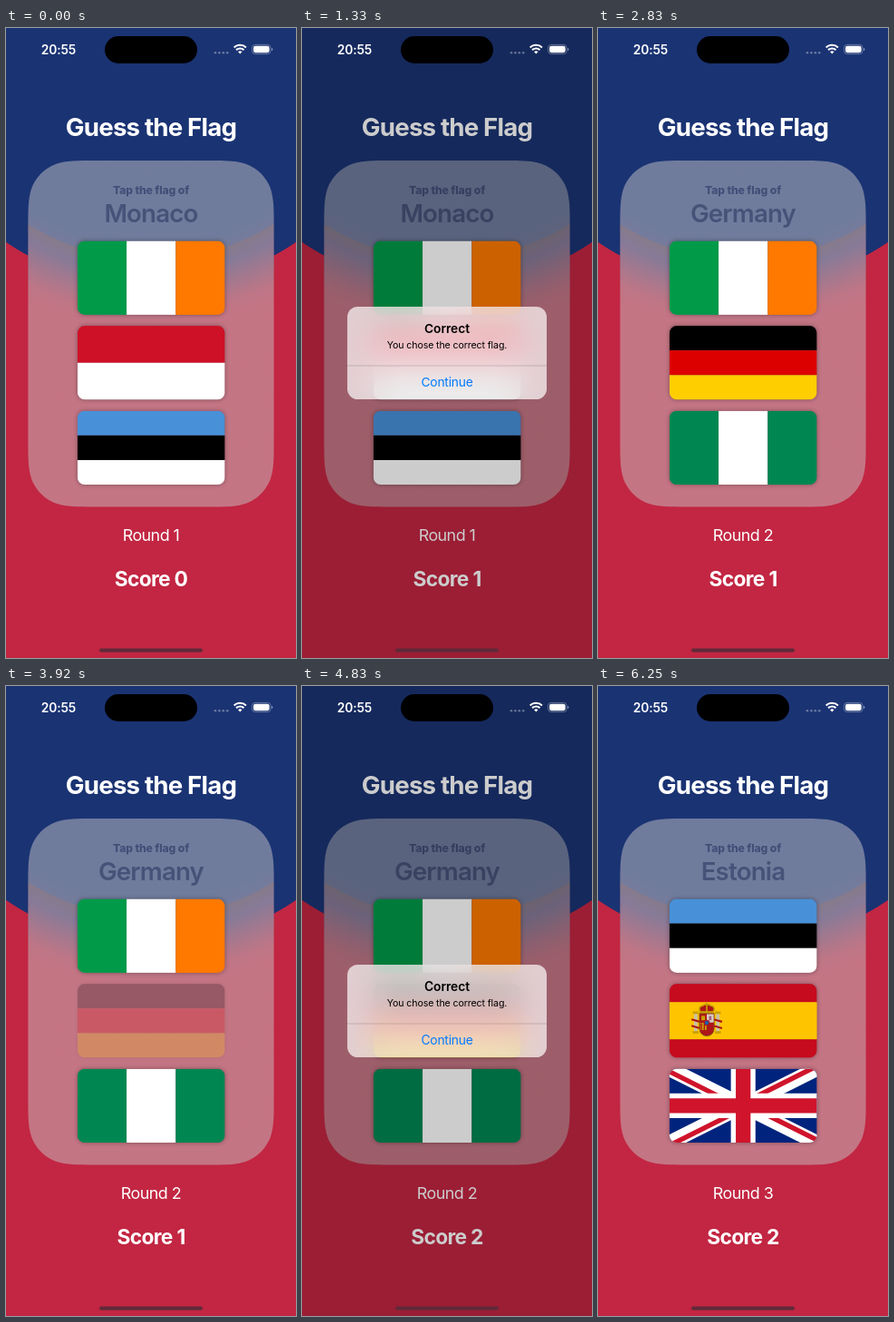
An HTML page for the animation above (8000 ms loop, 320 px wide and 694 px high).

```html
<!DOCTYPE html>
<html lang="en">
<head>
<meta charset="utf-8">
<title>Guess the Flag</title>
<style>
  html, body { margin: 0; width: 100%; height: 100%; overflow: hidden; background: #c22642; }
  #stage {
    position: relative; width: 320px; height: 694px; overflow: hidden;
    font-family: Inter, Roboto, sans-serif;
    background: radial-gradient(circle at 160px 0, #1a3373 284.6px, #c22642 285.4px);
  }
  #stage > * { position: absolute; left: 0; top: 0; }
  #card {
    left: 24.4px; top: 146px; width: 271.2px; height: 381.5px;
    background:
      linear-gradient(rgba(198, 196, 198, .5), rgba(198, 196, 198, .5)),
      radial-gradient(circle at 135.6px -146px,
        #1a3373 240px, #253270 255px, #46304f 0, #46306a 270px,
        #6e2d5b 285px, #962a4f 300px, #b72745 315px, #c22642 330px);
  }
  text { text-anchor: middle; fill: #fff; }
  .heading { font-size: 27.7px; font-weight: 700; letter-spacing: -.03em; }
  .prompt { font-size: 12.2px; font-weight: 800; letter-spacing: -.01em; fill: #434e78; }
  .country { font-size: 27.7px; font-weight: 600; letter-spacing: -.03em; fill: #475279; }
  .round { font-size: 17.9px; letter-spacing: -.03em; }
  .score { font-size: 22.8px; font-weight: 700; letter-spacing: -.03em; }
  .clock { font-size: 13.8px; font-weight: 600; letter-spacing: -.01em; }
  .flag { filter: drop-shadow(0 0 2.5px rgba(0, 0, 0, .36)); }
  #dim { width: 320px; height: 694px; background: #000; }
  #alert {
    left: 50px; top: 306.5px; width: 220px; height: 101.5px; border-radius: 11.5px; overflow: hidden;
    background: rgba(246, 246, 246, .75);
    -webkit-backdrop-filter: blur(18px) saturate(1.5);
    backdrop-filter: blur(18px) saturate(1.5);
  }
  #alert text { fill: #000; }
  #alert .title { font-size: 13.8px; font-weight: 600; letter-spacing: -.005em; }
  #alert .message { font-size: 10.6px; letter-spacing: -.01em; }
  #alert .action { font-size: 13.8px; letter-spacing: -.015em; fill: #007aff; }
</style>
</head>
<body>
<div id="stage">
  <div id="card"></div>
  <svg id="scene" width="320" height="694">
    <defs>
      <clipPath id="rounded"><rect width="60" height="30" rx="3"/></clipPath>
      <clipPath id="saltire"><path d="M30 15h30v15zv15h-30zh-30v-15zv-15h30z"/></clipPath>
    </defs>
    <text class="heading" x="160" y="119">Guess the Flag</text>
    <text class="prompt" x="160" y="183">Tap the flag of</text>
    <g id="rounds"></g>
    <text class="score" id="score" x="160" y="614.5"></text>
  </svg>
  <div id="dim"></div>
  <div id="alert">
    <svg width="220" height="102">
      <text class="title" x="110" y="29.5">Correct</text>
      <text class="message" x="110" y="46">You chose the correct flag.</text>
      <path d="M0 65h220" stroke="#3c3c43" stroke-opacity=".26" stroke-width=".8"/>
      <text class="action" x="110" y="88.5">Continue</text>
    </svg>
  </div>
  <svg width="320" height="694">
    <text class="clock" x="58" y="28.6">20:55</text>
    <rect x="109" y="9" width="102" height="30" rx="15"/>
    <g fill="#fff" fill-opacity=".35">
      <circle cx="231" cy="27.3" r="1.3"/><circle cx="235.4" cy="27.3" r="1.3"/>
      <circle cx="239.8" cy="27.3" r="1.3"/><circle cx="244.2" cy="27.3" r="1.3"/>
    </g>
    <g fill="none" stroke="#fff" stroke-width="2">
      <path d="M251.7 21.5a9.2 9.2 0 0 1 13.2 0M254.1 24.2a5.8 5.8 0 0 1 8.4 0"/>
      <path d="M258.3 28.6l-2.2-2.3a3.1 3.1 0 0 1 4.4 0z" fill="#fff" stroke="none"/>
    </g>
    <rect x="271.6" y="18.4" width="20.4" height="10.2" rx="3.3" fill="none" stroke="#fff" stroke-opacity=".4" stroke-width=".8"/>
    <rect x="273" y="19.8" width="17.6" height="7.4" rx="2.1" fill="#fff"/>
    <path d="M293 21.8q1.4.4 1.4 1.7t-1.4 1.7z" fill="#fff" fill-opacity=".45"/>
    <rect x="103" y="683.5" width="114" height="4" rx="2" fill="#5f2a3a"/>
  </svg>
</div>
<script>
const LOOP = 8000, FPS = 12;
const $ = id => document.getElementById(id);

// Continuous-curvature rounded rectangle
function squircle(w, h, r) {
  const corner = (x, y, dx, dy, flip) => {
    let p = [[0, 1.088], [0, .868], [.075, .631], [.169, .372], [.372, .169],
             [.631, .075], [.868, 0], [1.088, 0], [1.528, 0]];
    if (flip) p = p.map(([a, b]) => [b, a]);
    return "C" + p.map(([a, b]) => `${x + dx * a * r} ${y + dy * b * r}`).join(" ");
  };
  const e = 1.528 * r;
  return `M0 ${e}` + corner(0, 0, 1, 1) +
    `L${w - e} 0` + corner(w, 0, -1, 1, true) +
    `L${w} ${h - e}` + corner(w, h, -1, -1) +
    `L${e} ${h}` + corner(0, h, 1, -1, true) + "Z";
}
$("card").style.clipPath = `path("${squircle(271.2, 381.5, 49)}")`;

const rect = (x, y, w, h, fill) => `<rect x="${x}" y="${y}" width="${w}" height="${h}" fill="${fill}"/>`;
const columns = (...c) => c.map((f, i) => rect(i * 20, 0, 20, 30, f)).join("");
const rows = (...c) => c.map((f, i) => rect(0, i * 30 / c.length, 60, 30 / c.length, f)).join("");
const line = (d, color, width, extra = "") =>
  `<path d="${d}" fill="none" stroke="${color}" stroke-width="${width}" ${extra}/>`;

function arms() {
  const red = "#ad1519", gold = "#c8a000", grey = "#c9c2a5";
  const pillar = x => rect(x - .7, 12.2, 1.4, 7.2, grey) +
    rect(x - 1.2, 11.2, 2.4, 1, gold) + rect(x - 1.2, 19.2, 2.4, 1, gold) +
    line(`M${x - 1.7} 14.4l3.4 1M${x - 1.7} 17l3.4 1`, red, .8);
  return pillar(10.7) + pillar(19.7) +
    `<path d="M12.2 12h6v6.2a3 3 0 0 1-6 0z" fill="${red}" stroke="#7a5a10" stroke-width=".3"/>` +
    rect(15.2, 12.3, 2.8, 3.4, "#d8cfc4") + rect(12.5, 15.8, 2.6, 3, gold) +
    line("M13 16v3M14.2 16v3.8", red, .5) +
    rect(13, 13, 1.5, 1.8, gold) + rect(16.1, 13.1, 1, 1.7, "#a55b80") +
    `<circle cx="15.2" cy="15.8" r="1" fill="#1f5fa8" stroke="${red}" stroke-width=".4"/>` +
    `<path d="M12.6 11.5q-1.2-2.2.8-2.6q1.8-1.2 3.6 0q2 .4.8 2.6z" fill="${red}" stroke="${gold}" stroke-width=".6"/>` +
    line("M15.2 7.6v3.6M12.4 11.4h5.6", gold, .6);
}

const flags = {
  ireland: columns("#009a49", "#fff", "#ff7900"),
  nigeria: columns("#008751", "#fff", "#008751"),
  monaco: rows("#ce1126", "#fff"),
  estonia: rows("#4891d9", "#000", "#fff"),
  germany: rows("#000", "#dd0000", "#ffce00"),
  spain: rows("#c60b1e", "#ffc400", "#ffc400", "#c60b1e") + rect(0, 7.5, 60, 15, "#ffc400") + arms(),
  uk: rect(0, 0, 60, 30, "#00247d") +
    line("M0 0L60 30M60 0L0 30", "#fff", 6) +
    line("M0 0L60 30M60 0L0 30", "#cf142b", 4, 'clip-path="url(#saltire)"') +
    line("M30 0V30M0 15H60", "#fff", 10) + line("M30 0V30M0 15H60", "#cf142b", 6)
};

const rounds = [
  { from: 0, country: "Monaco", flags: ["ireland", "monaco", "estonia"], press: 325, release: 725, close: 2165 },
  { from: 2660, country: "Germany", flags: ["ireland", "germany", "nigeria"], press: 3910, release: 4305, close: 5520 },
  { from: 6000, country: "Estonia", flags: ["estonia", "spain", "uk"], press: 1e9, release: 1e9, close: 1e9 }
];

const flagMarkup = (name, i) =>
  `<g class="flag"><g transform="translate(78.8 ${234.5 + i * 93.6}) scale(2.713)">` +
  `<g clip-path="url(#rounded)">${flags[name]}</g></g></g>`;

$("rounds").innerHTML = rounds.map((r, i) =>
  `<g><text class="country" x="160" y="214">${r.country}</text>` +
  r.flags.map(flagMarkup).join("") +
  `<text class="round" x="160" y="565">Round ${i + 1}</text></g>`).join("");
const groups = [...$("rounds").children];
const picks = groups.map(g => g.querySelectorAll(".flag")[1]);

// Critically damped spring from 0 to 1
const spring = ms => {
  const x = Math.max(0, ms) * .0187;
  return 1 - (1 + x) * Math.exp(-x);
};

function draw(time) {
  const t = Math.floor(time * FPS / 1000 + .06) * 1000 / FPS;
  const index = rounds.findLastIndex(r => t >= r.from);
  const r = rounds[index];
  const open = spring(t - r.release);
  const shown = t >= r.close ? 1 - spring(t - r.close) : open;

  groups.forEach((g, i) => g.style.display = i === index ? "" : "none");
  $("score").textContent = "Score " + (index + (t >= r.release ? 1 : 0));
  picks[index].style.opacity = t < r.press ? 1
    : t < r.release ? (t - r.press < 60 ? .23 : .2)
    : .2 + .8 * open;
  $("dim").style.opacity = .2 * shown;
  $("alert").style.opacity = shown;
  $("alert").style.visibility = shown > .003 ? "visible" : "hidden";
  $("alert").style.transform = open > .995 ? "none" : `scale(${1.18 - .18 * open})`;
}

function tick() {
  draw(performance.now() % LOOP);
  requestAnimationFrame(tick);
}
tick();
</script>
</body>
</html>
```
